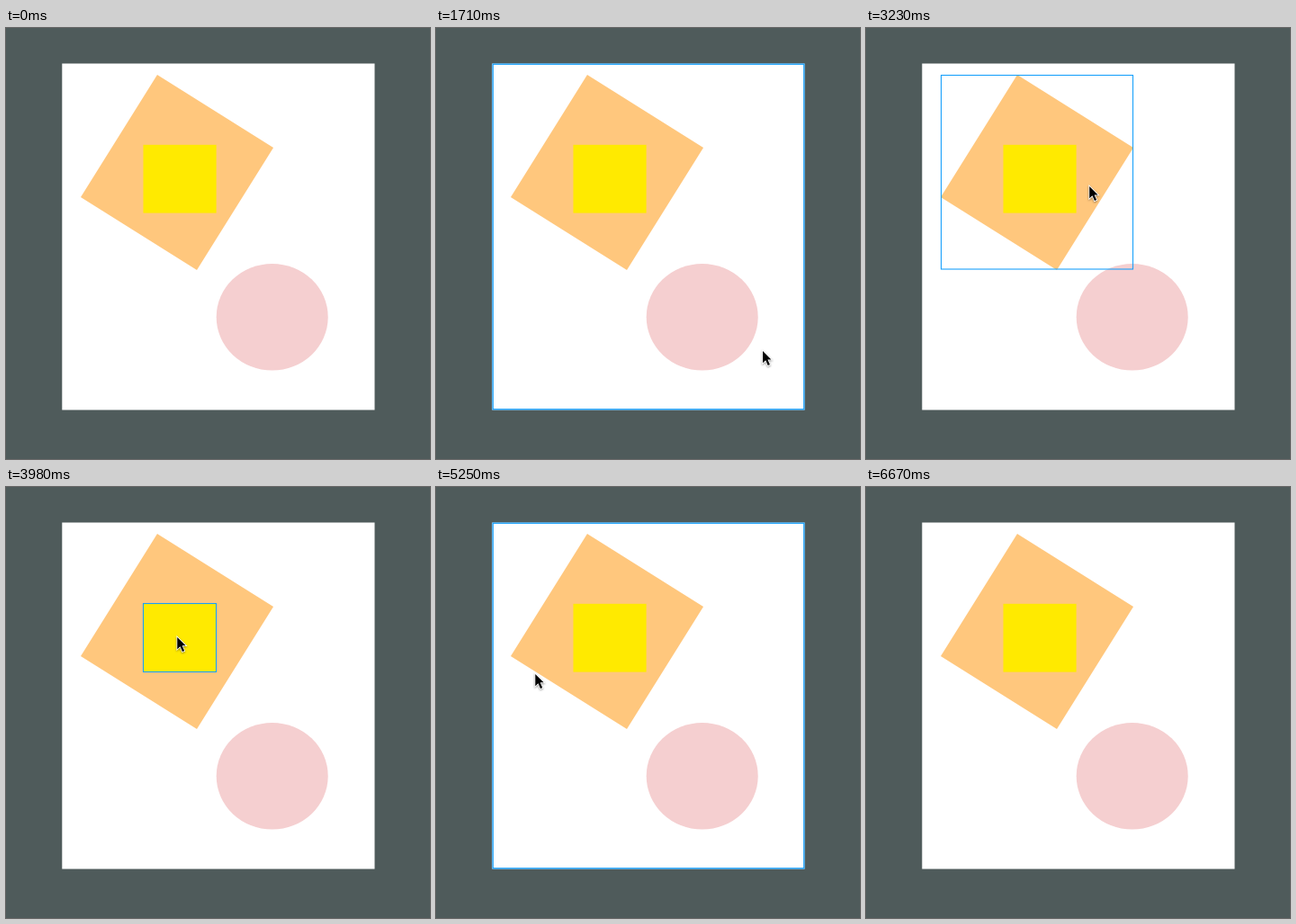
An HTML page for the animation above (7720 ms loop, 471 by 479 pixels).

```html
<!DOCTYPE html>
<html lang="en">
<head>
<meta charset="utf-8">
<title>Hover outlines</title>
<style>
  html, body { margin: 0; width: 100%; height: 100%; overflow: hidden; background: #4f5b5b; }
  svg { display: block; width: 100vw; height: 100vh; }
  .outline { fill: none; stroke: #18a0fb; stroke-width: 1.1; }
  #board { stroke-width: 1.4; }
  #cursor path { filter: drop-shadow(0 1px 1px rgba(0, 0, 0, .4)); }
</style>
</head>
<body>
<svg viewBox="0 0 471 479">
  <rect width="471" height="479" fill="#4f5b5b"/>
  <rect x="62.3" y="39.5" width="347.2" height="385" fill="#fff"/>
  <path d="M168 52 297 133 212 269 83 188Z" fill="#ffc77d"/>
  <rect x="152.5" y="129.8" width="81.1" height="75.8" fill="#ffea00"/>
  <ellipse cx="295.7" cy="321.2" rx="62" ry="59.3" fill="#f5cfd0"/>

  <rect id="board" class="outline" x="63.2" y="40.2" width="345.6" height="383.6"/>
  <rect id="tilted" class="outline" x="83.5" y="52.5" width="213" height="215.5"/>
  <rect id="yellow" class="outline" x="152.5" y="129.5" width="81" height="76"/>
  <ellipse id="circle" class="outline" cx="295.7" cy="321.2" rx="61.5" ry="58.8"/>

  <g id="cursor">
    <path d="M0 2V15.3L3.2 12.3 5.7 18.1 7.9 17.1 5.4 11.4H9.4Z" fill="#000" stroke="#fff" stroke-width="1.6" paint-order="stroke"/>
  </g>
</svg>
<script>
const LOOP = 7720, ENTER = 900, REST = 1410, MOVE = 1710, LEAVE = 6670;
const byId = id => document.getElementById(id);
const cursor = byId('cursor');
const outlines = ['board', 'tilted', 'yellow', 'circle'].map(byId);

// Pointer waypoints: time, x, y
const arrive = [[ENTER, 462, 388], [1130, 419, 382], [REST, 364, 358]];
const roam = [
  [MOVE, 363, 357], [2410, 285, 308], [3230, 247, 172], [3950, 191, 165],
  [4670, 134, 158], [5810, 85, 276], [6110, 48, 343], [6500, 22, 437], [LEAVE, 21.5, 482]
];

const inBoard = (x, y) => x > 62 && x < 410 && y > 39 && y < 425;
const inYellow = (x, y) => x > 152 && x < 234 && y > 129 && y < 206;
const inCircle = (x, y) => Math.hypot((x - 295.7) / 62, (y - 321.2) / 59.3) < 1;
const tiltedCorners = [[168, 52], [297, 133], [212, 269], [83, 188]];
const inTilted = (x, y) => tiltedCorners.every(([ax, ay], i) => {
  const [bx, by] = tiltedCorners[(i + 1) % 4];
  return (bx - ax) * (y - ay) - (by - ay) * (x - ax) > 0;
});

function hovered(x, y) {
  if (inCircle(x, y)) return 'circle';
  if (inYellow(x, y)) return 'yellow';
  if (inTilted(x, y)) return 'tilted';
  return inBoard(x, y) ? 'board' : '';
}

// The pointer is sampled at a steady rate
function sample(t, start, end, count) {
  const step = (end - start) / count;
  return start + Math.floor((t - start) / step + 0.1) * step;
}

// Cubic Hermite through the waypoints; it starts from rest on the roam path
function along(keys, t) {
  const last = keys.length - 1;
  let i = 0;
  while (i < last - 1 && t >= keys[i + 1][0]) i++;
  const a = keys[i], b = keys[i + 1], span = b[0] - a[0];
  const u = Math.min(1, Math.max(0, (t - a[0]) / span));
  const slope = (k, axis) => {
    if (k === 0 && keys === roam) return 0;
    if (k === last && keys === arrive) return 0;
    const p = keys[Math.max(0, k - 1)], n = keys[Math.min(last, k + 1)];
    return (n[axis] - p[axis]) / (n[0] - p[0]);
  };
  const at = axis => {
    const v = 1 - u;
    return v * v * (1 + 2 * u) * a[axis] + u * u * (3 - 2 * u) * b[axis]
      + span * u * v * (v * slope(i, axis) - u * slope(i + 1, axis));
  };
  return [at(1), at(2)];
}

function pointerAt(t) {
  if (t < ENTER || t >= LEAVE) return null;
  if (t < MOVE) return along(arrive, Math.min(REST, sample(t, ENTER, REST, 9)));
  return along(roam, sample(t, MOVE, LEAVE, 86));
}

function draw(t) {
  const p = pointerAt(t);
  const target = p ? hovered(...p) : '';
  for (const o of outlines) o.style.display = o.id === target ? '' : 'none';
  cursor.style.display = p ? '' : 'none';
  if (p) cursor.setAttribute('transform', `translate(${p[0].toFixed(2)} ${p[1].toFixed(2)})`);
}

const origin = performance.now();
function tick() {
  draw((performance.now() - origin) % LOOP);
  requestAnimationFrame(tick);
}
tick();
</script>
</body>
</html>
```
